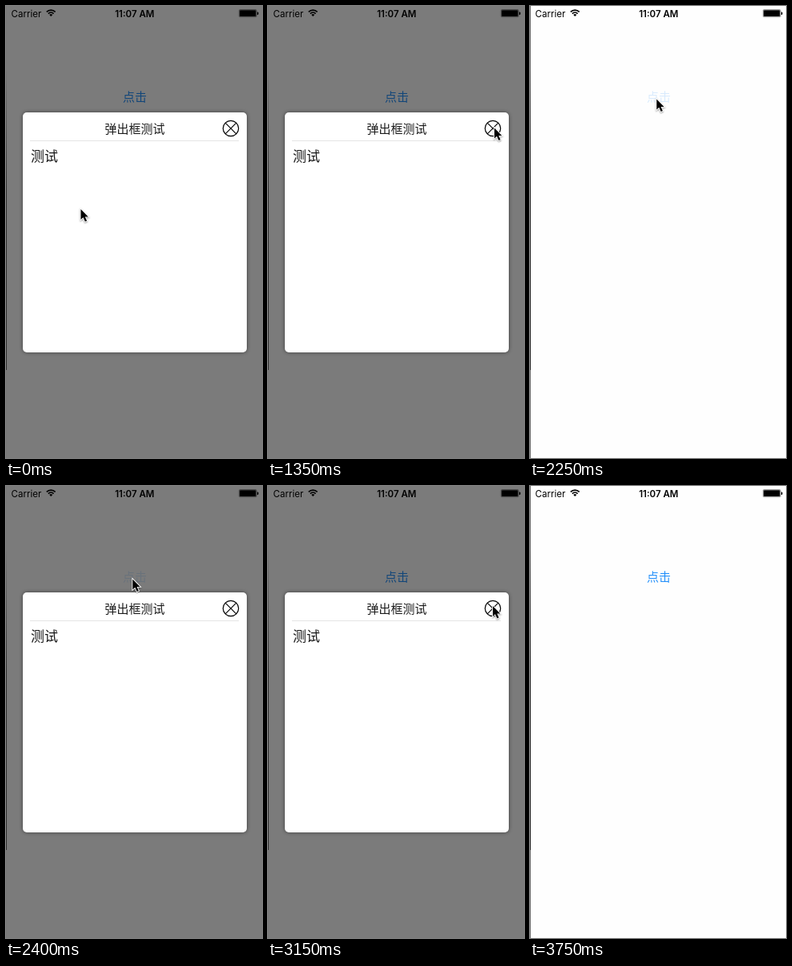
Write an HTML page with a canvas that moves like this. It is 320x565 px and loops after 4.13 s.

```html
<!DOCTYPE html>
<html lang="zh">
<head>
<meta charset="utf-8">
<title>弹出框测试</title>
<style>
  html, body { margin: 0; width: 100%; height: 100%; overflow: hidden; background: #fefefe; }
  canvas { display: block; width: 320px; height: 565px; }
</style>
</head>
<body>
<canvas id="stage" width="320" height="565"></canvas>
<script>
const ctx = document.getElementById('stage').getContext('2d');
const W = 320, H = 565;
const LOOP = 4130, TICK = 150;
const HELD_TICKS = [2, 5, 11, 22];
const LATIN = 'Inter, sans-serif';
const HAN = '"Noto Sans CJK SC", "Noto Sans CJK", sans-serif';

// Where the pointer rests or turns; it eases between these stops.
const REST = [102, 279.5], CLOSE = [283, 152.5], LINK = [158.3, 116.5];
const STOPS = [
  [0, [93.5, 254]], [150, REST], [450, REST], [1050, [297, 162.5]],
  [1350, CLOSE], [1500, CLOSE], [1680, [283, 169]], [2160, LINK], [2400, LINK],
  [2550, [159, 137]], [2700, [281, 173.5]], [3000, [281, 151]], [3150, [281, 150]],
  [3450, [254.5, 217.5]], [3600, [303, 516.5]]
];
const POINTER_GONE = 3750;

const during = (t, from, to) => t >= from && t < to;
const lerp = (a, b, u) => a + (b - a) * u;
const smooth = u => u * u * (3 - 2 * u);

function snap(t) {
  const tick = Math.floor(t / TICK);
  return TICK * (HELD_TICKS.includes(tick) ? tick - 1 : tick);
}

function pointerAt(t) {
  const next = STOPS.findIndex(([time]) => time > t);
  if (next < 0) return STOPS.at(-1)[1];
  const [t0, from] = STOPS[next - 1], [t1, to] = STOPS[next];
  const u = smooth((t - t0) / (t1 - t0));
  return from.map((v, i) => lerp(v, to[i], u));
}

function text(str, x, y, font, color = '#000', align = 'left') {
  ctx.font = font;
  ctx.fillStyle = color;
  ctx.textAlign = align;
  ctx.fillText(str, x, y);
}

function box(x, y, w, h, r, color) {
  ctx.beginPath();
  ctx.roundRect(x, y, w, h, r);
  ctx.fillStyle = color;
  ctx.fill();
}

function wifi(x, y) {
  const from = -Math.PI * 0.75, to = -Math.PI * 0.25;
  ctx.strokeStyle = ctx.fillStyle = '#000';
  ctx.lineWidth = 1.7;
  for (const r of [4.7, 7.7]) {
    ctx.beginPath();
    ctx.arc(x, y, r, from, to);
    ctx.stroke();
  }
  ctx.beginPath();
  ctx.moveTo(x, y);
  ctx.arc(x, y, 2.8, from, to);
  ctx.fill();
}

function statusBar() {
  text('Carrier', 6.6, 13.5, `11.5px ${LATIN}`);
  wifi(56.2, 12.9);
  text('11:07 AM', 160.8, 13.5, `600 11.5px ${LATIN}`, '#000', 'center');
  ctx.beginPath();
  ctx.roundRect(291.25, 4.5, 22, 9.25, 1.5);
  ctx.strokeStyle = 'rgba(0,0,0,.65)';
  ctx.lineWidth = 0.6;
  ctx.stroke();
  box(292, 5.25, 20.5, 7.75, 0.8, '#000');
  box(314, 7.5, 1.5, 3.5, [0, 1, 1, 0], '#000');
}

function popup() {
  ctx.save();
  ctx.shadowColor = 'rgba(0,0,0,.5)';
  ctx.shadowBlur = 5;
  box(21, 133, 280, 300, 5, '#fff');
  ctx.restore();
  text('弹出框测试', 161, 158.5, `300 15px ${HAN}`, '#1c1c1c', 'center');
  text('测试', 31, 194, `300 17px ${HAN}`, '#161616');
  box(30, 168, 261, 1, 0, '#e4e4e4');

  ctx.strokeStyle = '#000';
  ctx.lineWidth = 1.2;
  ctx.beginPath();
  ctx.arc(281, 153, 9.7, 0, Math.PI * 2);
  for (const s of [-1, 1]) {
    ctx.moveTo(281 - 6.8, 153 - 6.8 * s);
    ctx.lineTo(281 + 6.8, 153 + 6.8 * s);
  }
  ctx.stroke();
}

function pointer(x, y) {
  ctx.save();
  ctx.translate(x, y);
  const arrow = new Path2D('M0 0V13L3 10.3L5.4 15.6L7.6 14.6L5.3 9.4H9.3Z');
  ctx.shadowColor = 'rgba(0,0,0,.4)';
  ctx.shadowBlur = 2;
  ctx.shadowOffsetY = 1;
  ctx.lineWidth = 1.8;
  ctx.strokeStyle = '#fff';
  ctx.stroke(arrow);
  ctx.shadowColor = 'transparent';
  ctx.fillStyle = '#000';
  ctx.fill(arrow);
  ctx.restore();
}

// A one-pixel dark edge, deepest around the middle of the screen.
function leftEdge() {
  box(0, 0, 1, H, 0, '#787878');
  const shade = ctx.createLinearGradient(0, 80, 0, 455);
  shade.addColorStop(0, 'rgba(0,0,0,0)');
  shade.addColorStop(0.4, 'rgba(0,0,0,.6)');
  shade.addColorStop(1, 'rgba(0,0,0,.6)');
  box(0, 80, 1, 375, 0, shade);
}

function draw(t) {
  const open = t < 1500 || during(t, 2400, 3450);
  const linkAlpha = during(t, 2250, 2550) ? 0.17 : during(t, 2550, 2700) ? 0.75 : 1;

  box(0, 0, W, H, 0, '#fefefe');
  ctx.globalAlpha = linkAlpha;
  text('点击', 161, 119.3, `300 15px ${HAN}`, '#2590fa', 'center');
  ctx.globalAlpha = 1;
  if (open) box(0, 0, W, H, 0, 'rgba(0,0,0,.515)');
  statusBar();
  if (open) popup();
  leftEdge();
  if (t < POINTER_GONE) pointer(...pointerAt(t));
}

const begin = performance.now();
function tick() {
  draw(snap((performance.now() - begin) % LOOP));
  requestAnimationFrame(tick);
}
tick();
</script>
</body>
</html>
```
